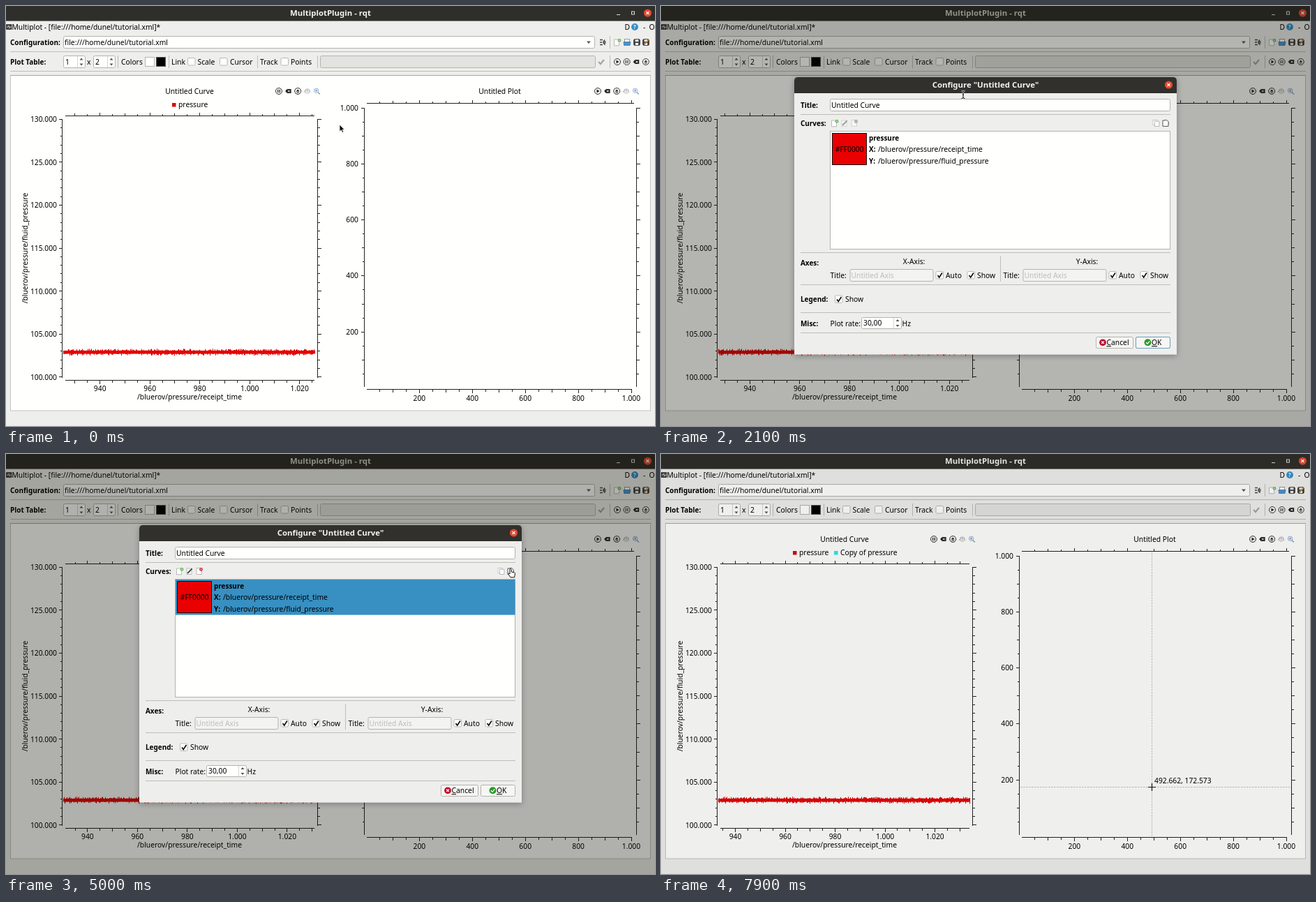
Write an HTML page that moves like this. It is 930 by 602 pixels and loops after 8 s.

```html
<!DOCTYPE html>
<html lang="en">
<head>
<meta charset="utf-8">
<title>Multiplot</title>
<style>
html, body { margin: 0; width: 100%; height: 100%; overflow: hidden; background: #eeeeec; }
svg { display: block; width: 930px; height: 602px; }
text { font: 10.3px "Noto Sans", "Open Sans", sans-serif; fill: #000; white-space: pre; }
.b { font-weight: 700; font-size: 9.95px; }
.h { font-weight: 700; font-size: 11.4px; fill: #f6f4f0; }
.ghost { fill: #bdbdba; }
.crisp { shape-rendering: crispEdges; }
</style>
</head>
<body>
<svg id="stage" viewBox="0 0 930 602"></svg>
<script>
const LOOP = 8000, STEP = 100;
const OPEN = 1700, SELECT = 2900, COPY = 4400, PASTE = 6500, CLOSE = 7700;
const INK = '#222', DIM = .32;

// Static drawing helpers; text is placed by its vertical centre.
const text = (x, cy, s, cls = '', anchor = 'start', extra = '') =>
  `<text x="${x}" y="${cy + 3.7}" class="${cls}" text-anchor="${anchor}" ${extra}>${s}</text>`;
const mid = (x, cy, s, cls) => text(x, cy, s, cls, 'middle');
const bold = (x, cy, s) => text(x, cy, s, 'b');
const path = (d, stroke = INK, w = 1, fill = 'none', extra = '') =>
  `<path d="${d}" stroke="${stroke}" stroke-width="${w}" fill="${fill}" ${extra}/>`;
const rect = (x, y, w, h, fill, stroke = 'none', r = 0) =>
  `<rect x="${x}" y="${y}" width="${w}" height="${h}" rx="${r}" fill="${fill}" stroke="${stroke}"/>`;
const circle = (x, y, r, fill, stroke = 'none') =>
  `<circle cx="${x}" cy="${y}" r="${r}" fill="${fill}" stroke="${stroke}"/>`;
const group = (id, body = '', extra = '') => `<g id="${id}" ${extra}>${body}</g>`;
const at = (x, y, body) => `<g transform="translate(${x} ${y})">${body}</g>`;
const hline = (x1, x2, y, c = '#bdbdb9') => path(`M${x1} ${y}H${x2}`, c, 1, 'none', 'class="crisp"');
const vline = (x, y1, y2, c = '#bdbdb9') => path(`M${x} ${y1}V${y2}`, c, 1, 'none', 'class="crisp"');
const field = (x1, y1, x2, y2, fill = '#fffffe') =>
  rect(x1 + .5, y1 + .5, x2 - x1 - 1, y2 - y1 - 1, fill, '#b4b3ae', 2);
const check = (x, cy, on) => rect(x + .5, cy - 5.5, 10.5, 10.5, '#fffffe', '#bab9b4', 1.5) +
  (on ? path(`M${x + 3} ${cy}l2.2 3l4.2 -6.5`, '#111', 1.7) : '');
const tri = (x, y, w, h) => path(`M${x - w} ${y}h${2 * w}l${-w} ${h}z`, 'none', 0, '#555');
const spin = (x1, y1, x2, y2, s) => field(x1, y1, x2, y2) + text(x1 + 3, (y1 + y2) / 2, s) +
  vline(x2 - 11.5, y1 + 1, y2 - 1, '#d4d4d0') +
  tri(x2 - 6, (y1 + y2) / 2 - 2.5, 2.5, -3) + tri(x2 - 6, (y1 + y2) / 2 + 2.5, 2.5, 3);
const closeButton = (x, y) => circle(x, y, 5.6, '#e2492f') +
  path(`M${x - 2} ${y - 2}l4 4m0 -4l-4 4`, '#fff', 1.1);

const ring = circle(0, 0, 4.5, '#f4f4f2', '#333');
const icons = {
  play: ring + path('M-1.5 -2.4V2.4L2.6 0Z', 'none', 0, INK),
  pause: ring + path('M-1.3 -2.2V2.2M1.3 -2.2V2.2', INK, 1.2),
  clear: path('M-4.5 0L-1.8 -3H4V3H-1.8Z', 'none', 0, INK) + path('M-.8 -1.5l3 3m0 -3l-3 3', '#fff', 1),
  save: ring + path('M-2.5 .6L0 -2.6L2.5 .6ZM-1.8 1.4H1.8V2.4H-1.8Z', 'none', 0, INK),
  gear: circle(0, 0, 3.3, 'none', '#bbb') + circle(0, 0, 1.2, '#eee', '#ccc') +
    path('M-4.4 1.5A4.6 4.6 0 0 1 4.4 1.5', '#888', 1, 'none', 'stroke-dasharray="1.5 1.2"'),
  zoom: path('M1.5 1.5L4.4 4.4', '#999', 1.4) + circle(-.8, -.8, 3.2, '#e6eff9', '#9bb6d2') +
    path('M-2.3 -.8H.7M-.8 -2.3V.7', '#6c95c2', .9),
  page: path('M-4 -4.5H2L3.5 -3V4.5H-4Z', '#aaa', .8, '#fff'),
  pageNew: path('M-4.5 -4H2.5V4.8H-4.5Z', '#aaa', .8, '#fff') + circle(3, -2.8, 2.3, '#4aad3c') +
    path('M1.7 -2.8H4.3M3 -4.1V-1.5', '#fff', .7),
  open: rect(-3.5, -4.5, 7, 5, '#fff', '#999') + path('M-5 -.5H5L4 4.4H-4.4Z', '#2e6ea6', .7, '#4a94cc'),
  disk: rect(-4.2, -4.2, 8.4, 8.4, '#444', '#222', 1) + rect(-2.5, -4, 5, 3.2, '#ddd') + rect(-2.2, 1, 4.4, 3, '#eee'),
  edit: path('M-4 -4H3V4.5H-4Z', '#aaa', .8, '#fff') + path('M-3 3L3.6 -3.6', '#444', 2),
  copy: path('M-4.5 -4.5H1.5V2.5H-4.5Z', '#bbb', .8, '#fff') + path('M-2 -2.8H4.3V4.5H-2Z', '#aaa', .8, '#fff'),
  paste: path('M-1 -4H-4V4.4H4V-1', '#555', 1, '#fff') + path('M-1.5 -4.4H2L4.2 -2V1.5', '#555', 1, '#fff'),
  tree: path('M-4 -3.5H0M-4 0H-1M-4 3.5H0M3 -3.5L1 -1H4.5M3.5 3.8L1 1H4.5', '#444', 1.3)
};
const icon = (name, x, y) => at(x, y, icons[name]);
const plotBar = (names, x, y) => names.map((n, i) => icon(n, x + i * 13.6, y)).join('');

// Axis ticks: longest for majors, shorter for the middle one, shortest for minors.
const px = v => Math.floor(v) + .5;
const tickLen = (i, per) => i % per === 0 ? 5 : per % 2 === 0 && i % (per / 2) === 0 ? 4 : 3;
function yAxis(left, right, y1, y2, top, gap, per, count) {
  let d = `M${left} ${y1}V${y2}M${right} ${y1}V${y2}`;
  for (let i = 0; i <= count; i++) {
    const n = tickLen(i, per), y = px(top + i * gap);
    d += `M${left} ${y}h${-n}M${right} ${y}h${n}`;
  }
  return path(d, INK, 1, 'none', 'class="crisp"');
}
function xTick(x, top, bottom, n) {
  return `M${px(x)} ${top}v${-n}M${px(x)} ${bottom}v${n}`;
}

function leftPlot() {
  let s = mid(263, 122, 'Untitled Curve') + plotBar(['pause', 'clear', 'save', 'gear', 'zoom'], 391, 122);
  s += yAxis(80.5, 446.5, 162, 532.5, 162.2, 12.32, 5, 30);
  for (let i = 0; i < 7; i++) s += text(73, 162.5 + i * 61.6, 130 - i * 5 + '.000', '', 'end');
  s += mid(263, 560, '/bluerov/pressure/receipt_time');
  return s + text(0, 0, '/bluerov/pressure/fluid_pressure', '', 'middle', 'transform="translate(27 347) rotate(-90)"');
}
function rightPlot() {
  let s = mid(707.5, 122, 'Untitled Plot') + plotBar(['play', 'clear', 'save', 'gear', 'zoom'], 848, 122);
  s += yAxis(513.5, 903.5, 146, 545.5, 146.2, 20.06, 4, 19);
  let d = 'M517 139.5H900M517 549.5H897';
  for (let i = 1; i <= 20; i++) d += xTick(516.6 + i * 18.98, 139.5, 549.5, tickLen(i, 4));
  s += path(d, INK, 1, 'none', 'class="crisp"');
  for (let i = 1; i <= 5; i++) {
    const label = i === 5 ? '1.000' : i * 200;
    s += mid(516.5 + i * 75.9, 562, label) + text(505, 547 - i * 80.2, label, '', 'end');
  }
  return s;
}

function mainWindow() {
  const file = 'file:///home/dunel/tutorial.xml';
  let s = rect(0, 0, 930, 602, '#eeeeec') + rect(0, 0, 930, 21.5, '#2f2e2b');
  s += text(465, 10.5, 'MultiplotPlugin - rqt', 'h', 'middle', 'id="caption"');
  s += path('M875 12.5h5', '#ddd', 1) + rect(896.5, 8, 4, 4, 'none', '#ddd') + closeButton(919.5, 10);
  s += rect(0, 26, 8.5, 8, '#444', 'none', 1) + path('M1 30h2l1 -2l1 4l1 -2h2', '#ddd', .8);
  s += text(8.5, 30, `Multiplot - [${file}]*`) + text(886.5, 30, 'D') + circle(901, 30, 4.9, '#2f8fcb');
  s += text(901, 29.5, '?', 'h', 'middle', 'style="font-size:8px"') + text(913, 30, '-') + text(921.5, 30, 'O');
  s += bold(6, 52, 'Configuration:') + field(82, 43, 844, 61) + text(84, 52, file) + tri(835, 50.5, 3, 3.5);
  s += icon('tree', 855, 52) + icon('pageNew', 876, 52) + icon('open', 890, 52) + icon('disk', 904, 52);
  s += icon('disk', 917, 52) + path('M915 55L921 48', '#c98a35', 1.8);
  s += hline(6, 924, 65.5) + hline(6, 924, 93.5);
  s += bold(6, 80, 'Plot Table:') + spin(82, 71, 114, 89, '1') + text(116, 80, 'x') + spin(125, 71, 157, 89, '2');
  s += text(165, 80, 'Colors') + rect(199.5, 73.5, 13, 13, '#fffffe', '#b4b3ae') + rect(215.5, 73.5, 13, 13, '#000', '#555');
  s += text(237, 80, 'Link') + check(260, 80) + text(274.5, 80, 'Scale') + check(306, 80) + text(321, 80, 'Cursor');
  s += text(364, 80, 'Track') + check(393.5, 80) + text(408, 80, 'Points') + field(450, 71, 845, 89, '#e3e3e0');
  s += [160.5, 233.5, 360.5, 446.5, 865.5].map(x => vline(x, 71, 89)).join('') + vline(865.5, 43, 61);
  s += path('M849 80l3 3l5 -6', '#a5a5a1', 2.2) + plotBar(['play', 'pause', 'clear', 'save'], 876, 80);
  s += rect(6.5, 99.5, 917, 480.5, '#fffffe', '#c4c4c0') + hline(6, 924, 99.5, '#a6a6a2');
  return s + leftPlot() + rightPlot();
}

function curveItem(y, color, hex, name) {
  return rect(245.5, y + 2.5, 49, 45, color, '#111') + mid(270.2, y + 25.5, hex) + bold(298, y + 9, name) +
    bold(298, y + 25.5, 'X:') + text(311, y + 25.5, '/bluerov/pressure/receipt_time') +
    bold(298, y + 42, 'Y:') + text(311, y + 42, '/bluerov/pressure/fluid_pressure');
}
function axisForm(x, title) {
  return mid(x + 120, 366.5, title) + text(x, 386, 'Title:') + field(x + 28, 377, x + 148, 395, '#f3f3f1') +
    text(x + 30, 386, 'Untitled Axis', 'ghost') + check(x + 151, 386, true) + text(x + 165.5, 386, 'Auto') +
    check(x + 196, 386, true) + text(x + 210.5, 386, 'Show');
}
function dialogWindow() {
  let s = path('M191 499.5V107q0 -5 5 -5H734q5 0 5 5V499.5Z', 'none', 0, '#eeeeec', 'filter="url(#shadow)"');
  s += path('M191 125V107q0 -5 5 -5H734q5 0 5 5V125Z', 'none', 0, '#31302c');
  s += mid(465, 113.5, 'Configure "Untitled Curve"', 'h') + closeButton(727.5, 113);
  s += bold(200, 142, 'Title:') + field(242, 133, 730, 151) + text(244, 142, 'Untitled Curve');
  s += bold(200, 168, 'Curves:') + icon('pageNew', 249, 168);
  s += group('itemTools', icon('edit', 263, 168) + icon('page', 277, 168) + circle(279.5, 165.5, 2.4, '#c8202c') +
    path('M278.2 164.2l2.6 2.6m0 -2.6l-2.6 2.6', '#fff', .7));
  s += icon('copy', 709.5, 168) + icon('paste', 723, 168);
  s += rect(242.5, 179.5, 487, 169, '#fffffe', '#b4b3ae') + group('selection', rect(243, 180, 486.5, 50.6, '#388fc1'));
  s += curveItem(180, '#ea0000', '#FF0000', 'pressure') + group('pasted', curveItem(230.6, '#12fbff', '#00FCFF', 'Copy of pressure'));
  s += [155.5, 353.5, 399.5, 439.5, 468.5].map(y => hline(200, 730, y)).join('') + vline(486.5, 358, 395);
  s += bold(200, 368.5, 'Axes:') + axisForm(242.5, 'X-Axis:') + axisForm(490.5, 'Y-Axis:');
  s += bold(200, 420.5, 'Legend:') + check(249, 420.5, true) + text(264, 420.5, 'Show');
  s += bold(200, 455, 'Misc:') + text(242.5, 455, 'Plot rate:') + spin(287, 446, 345, 463, '30,00') + text(345.5, 455, 'Hz');
  s += field(623, 474, 677, 491, '#f6f6f4') + field(680, 474, 730, 491, '#f6f6f4');
  s += group('focus', rect(680.5, 474.5, 49, 16, 'none', '#6d9fbd', 2));
  s += circle(633, 482.3, 4.9, '#c2102a') + path('M631.2 480.5l3.6 3.6m0 -3.6l-3.6 3.6', '#fff', 1.2);
  s += text(638.5, 482.5, '<tspan text-decoration="underline">C</tspan>ancel');
  s += circle(697.5, 482.3, 5, '#2c9a2c') + path('M695 482.3l2 2l3.2 -4', '#fff', 1.3);
  return s + text(703, 482.5, '<tspan text-decoration="underline">O</tspan>K');
}

const beam = 'M-2.5 -2.5Q0 -2.5 0 -1V7Q0 8.5 -2.5 8.5M2.5 -2.5Q0 -2.5 0 -1M0 7Q0 8.5 2.5 8.5M-1 3H1';
const cursors = {
  arrow: path('M0 0V9.8L2.3 7.8L3.9 11.4L5.6 10.6L4 7.2H7Z', '#fff', .7, '#111'),
  beam: path(beam, '#e8e8e6', 2.2) + path(beam, '#111', 1),
  hand: path('M-1 0Q.5 -1.2 1.3 .5V4L5.6 5Q6.6 5.4 6.4 7L5.6 11.8H0L-3.3 7.2Q-3.6 5.6 -2 6L-1 7Z', '#111', 1, '#fff'),
  cross: path('M-5.5 0H5.5M0 -5.5V5.5', '#111', 1.2)
};
const marker = (x, color, label) => rect(x, 139, 5.5, 5.5, color) + text(x + 9, 141.5, label);

const stage = document.getElementById('stage');
stage.innerHTML = `<defs><filter id="shadow" x="-10%" y="-10%" width="120%" height="125%">
  <feDropShadow dx="0" dy="2" stdDeviation="4" flood-opacity=".3"/></filter></defs>` +
  mainWindow() +
  group('single', marker(238, '#dd0808', 'pressure')) +
  group('double', marker(189, '#dd0808', 'pressure') + marker(248, '#2fe6ea', 'Copy of pressure')) +
  path('', '#e30606', 1.1, 'none', 'id="band"') +
  path('', INK, 1, 'none', 'id="timeTicks" class="crisp"') + group('timeLabels') +
  group('tracker', path('M703.5 141V549M515 477.5H903', '#b4b4b1', .8, 'none', 'stroke-dasharray="2.6 1.4"') +
    text(707, 468.5, '492.662, 172.573')) +
  '<rect id="dim" width="930" height="602" fill="#0a0a00"/>' + group('dialog', dialogWindow()) + group('pointer');

const el = {};
stage.querySelectorAll('[id]').forEach(node => el[node.id] = node);
const show = (node, on) => node.setAttribute('display', on ? 'inline' : 'none');
const clamp = v => Math.max(0, Math.min(1, v));

const track = [
  [0, 478, 170], [500, 478, 170], [900, 463, 139], [1400, 433, 124], [2200, 433, 124], [2800, 548, 204],
  [3300, 548, 204], [3700, 734, 176], [4000, 730, 168], [4300, 710, 165], [4500, 710, 165], [4900, 723, 165],
  [6500, 723, 165], [6800, 739, 290], [7200, 703, 474], [CLOSE, 703, 474], [CLOSE + 1, 703.5, 477.5], [LOOP, 703.5, 477.5]
];
function pointerAt(t) {
  const i = Math.max(1, track.findIndex(k => k[0] >= t));
  const [t0, x0, y0] = track[i - 1], [t1, x1, y1] = track[i];
  const u = (t - t0) / (t1 - t0), e = u * u * (3 - 2 * u);
  return [x0 + (x1 - x0) * e, y0 + (y1 - y0) * e];
}
function cursorKind(t) {
  if (t > CLOSE) return 'cross';
  if (t >= 1800 && t < 2300) return 'beam';
  return t >= 3900 && t < 6600 ? 'hand' : 'arrow';
}
function dimAt(t) {
  if (t < CLOSE) { const u = clamp((t - OPEN) / 500); return DIM * u * (2 - u); }
  return DIM * (1 - clamp((t - CLOSE) / 250));
}
const noise = n => { const v = Math.sin(n * 12.9898) * 43758.5453; return v - Math.floor(v); };

function drawTimeAxis(t) {
  const shift = 3.56 * t / 1000;
  let ticks = 'M85 157.5H442M85 536.5H442', labels = '', band = '';
  for (let v = 920; v <= 1040; v += 5) {
    const x = 134.7 + (v - 940) * 3.575 - shift;
    if (x < 84 || x > 442) continue;
    ticks += xTick(x, 157.5, 536.5, tickLen(v / 5, 4));
    if (v % 20 === 0) labels += mid(x, 548.5, v < 1000 ? v : (v / 1000).toFixed(3));
  }
  const offset = Math.round(shift);
  for (let x = 82; x < 443; x++) {
    const n = x + offset;
    const up = 494 - 2.8 * noise(n) ** 3, down = 498.4 + 2.8 * noise(n + 700) ** 3;
    band += `M${x + .5} ${up.toFixed(1)}V${down.toFixed(1)}`;
  }
  el.timeTicks.setAttribute('d', ticks);
  el.timeLabels.innerHTML = labels;
  el.band.setAttribute('d', band);
}

function render(t) {
  const open = t > OPEN && t < CLOSE, [x, y] = pointerAt(t);
  drawTimeAxis(t);
  show(el.dialog, open);
  show(el.selection, t >= SELECT);
  show(el.pasted, t >= PASTE);
  show(el.focus, t < COPY);
  show(el.single, t < PASTE);
  show(el.double, t >= PASTE);
  show(el.tracker, t > CLOSE);
  el.itemTools.setAttribute('opacity', t >= SELECT ? 1 : .5);
  el.itemTools.style.filter = t >= SELECT ? 'none' : 'grayscale(1)';
  el.dim.setAttribute('opacity', dimAt(t));
  el.caption.style.fill = open ? '#d0cdc6' : '#f6f4f0';
  el.pointer.innerHTML = cursors[cursorKind(t)];
  el.pointer.setAttribute('transform', `translate(${x} ${y})`);
}

const start = performance.now();
function frame() {
  const t = (performance.now() - start) % LOOP;
  render(Math.floor(t / STEP) * STEP);
  requestAnimationFrame(frame);
}
frame();
</script>
</body>
</html>
```
